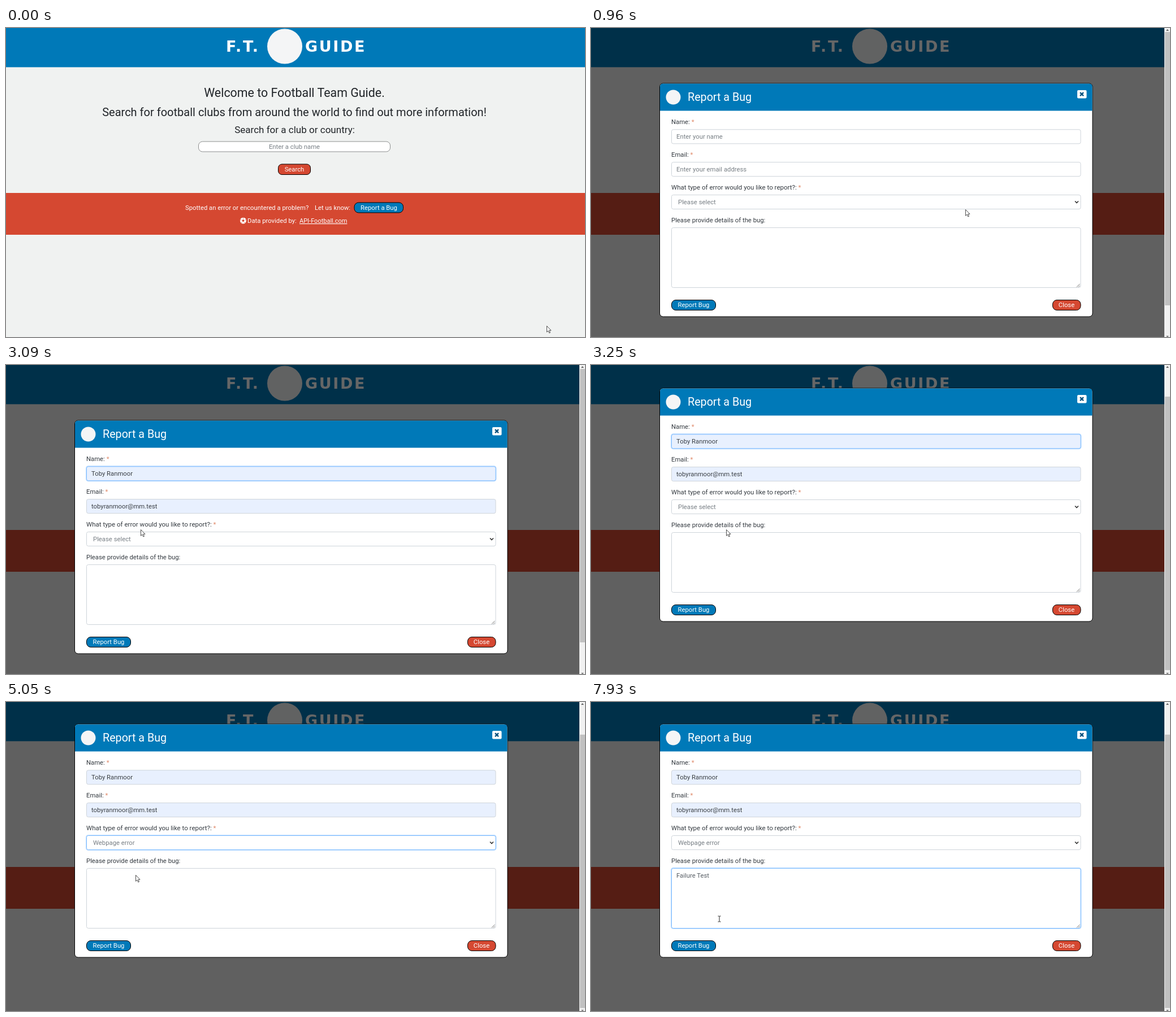
An HTML page for the animation above (8 s loop, 1024 by 547 pixels).

```html
<!DOCTYPE html>
<html lang="en">
<head>
<meta charset="utf-8">
<title>Report a bug</title>
<style>
  html, body { margin: 0; width: 100%; height: 100%; overflow: hidden; background: #f0f2f1; }
  svg { display: block; width: 100vw; height: 100vh; }
  text { font-family: Roboto, "Open Sans", sans-serif; font-size: 11.3px; fill: #343a40; white-space: pre; }
  .heading { fill: #212529; }
  .mid { text-anchor: middle; }
  .light { fill: #fff; }
  .hint { fill: #787f85; }
  .value { fill: #3b4045; }
  .entry { fill: #565d64; }
  .star { fill: #e08a6a; }
  .wordmark { font: bold 27px "DejaVu Sans", sans-serif; letter-spacing: 2.6px; fill: #fff; }
  .box { fill: #fff; stroke: #ced4da; }
  .box.filled { fill: #e8f0fe; }
  .box.focus { stroke: #80bdff; }
  .ring { fill: none; stroke: #bfdeff; stroke-width: 3; }
  .blue { fill: #0079b8; }
  .red { fill: #d54831; }
  .edge { stroke: #000; }
</style>
</head>
<body>
<svg viewBox="0 0 1024 547" preserveAspectRatio="none">
  <defs>
    <filter id="shadow" x="-5%" y="-20%" width="110%" height="150%">
      <feDropShadow dx="0" dy="2" stdDeviation="1.5" flood-opacity=".4"/>
    </filter>
  </defs>

  <rect width="1024" height="547" fill="#f0f2f1"/>
  <rect class="blue" width="1024" height="69.4"/>
  <text class="wordmark" x="389" y="42">F.T.</text>
  <circle cx="493" cy="32.5" r="31" fill="#f4f5f6"/>
  <text class="wordmark" x="529" y="42">GUIDE</text>

  <text class="mid heading" x="510" y="122" style="font-size:21.4px">Welcome to Football Team Guide.</text>
  <text class="mid heading" x="510" y="155.5" style="font-size:20.02px">Search for football clubs from around the world to find out more information!</text>
  <text class="mid heading" x="510.5" y="186" style="font-size:17.05px">Search for a club or country:</text>
  <rect x="340.5" y="201" width="339" height="18" rx="7" fill="#fff" stroke="#8d8f8f"/>
  <text class="mid hint" x="510" y="213.5">Enter a club name</text>
  <rect class="red edge" x="481.5" y="241" width="57" height="18.5" rx="6.5"/>
  <text class="mid light" x="510" y="254">Search</text>

  <rect class="red" y="292" width="1024" height="74"/>
  <text class="light" x="317" y="322">Spotted an error or encountered a problem?</text>
  <text class="light" x="546" y="322">Let us know:</text>
  <rect class="blue edge" x="616" y="309" width="86.5" height="18" rx="7.5"/>
  <text class="mid light" x="659.5" y="322">Report a Bug</text>
  <g transform="translate(419.5 341)">
    <circle r="5.5" fill="#fff"/>
    <path class="red" d="M0-2.2 2.1-.7 1.3 1.8H-1.3L-2.1-.7Z"/>
    <path d="M0-5V-3.5M4.7-1.5 3.4-1.1M2.9 4 2 2.8M-2.9 4-2 2.8M-4.7-1.5-3.4-1.1" stroke="#d54831"/>
  </g>
  <text class="light" x="427" y="345">Data provided by:</text>
  <text class="light" x="519" y="345" text-decoration="underline" style="font-size:11px">API-Football.com</text>

  <g id="dialog">
    <rect width="1024" height="547" opacity=".6"/>
    <g id="panel">
      <rect class="edge" x="121.5" y="98" width="765.5" height="413" rx="6" fill="#fff"/>
      <path class="blue" d="M122 146.600V104Q122 98.500 127.500 98.500H881Q886.500 98.500 886.500 104V146.600Z"/>
      <circle cx="145.500" cy="122.500" r="13" fill="#f4f5f6"/>
      <text class="light" x="171" y="128.500" style="font-size:19.7px">Report a Bug</text>
      <rect x="860" y="110" width="16.500" height="14.500" rx="2" fill="#fff"/>
      <path d="M865 114.200 871 120.200M871 114.200 865 120.200" stroke="#07527f" stroke-width="2.4"/>

      <text x="142" y="170">Name: <tspan class="star">*</tspan></text>
      <text x="142" y="228">Email: <tspan class="star">*</tspan></text>
      <text x="142" y="286" style="font-size:11.5px">What type of error would you like to report?: <tspan class="star">*</tspan></text>
      <text x="142" y="343.500">Please provide details of the bug:</text>
      <g id="fields"></g>
      <text id="name" x="151" y="196"></text>
      <text id="email" x="151" y="254"></text>
      <text id="choice" class="hint" x="154" y="312"></text>
      <path d="M856 306.500 859 309.500 862 306.500" fill="none" stroke="#333" stroke-width="1.6"/>
      <text id="details" class="entry" x="151" y="370"></text>
      <rect id="caret" y="358" width="1" height="15" fill="#222"/>
      <path d="M859 458.500 864.500 453M862 458.500 864.500 456" stroke="#777"/>

      <rect class="blue edge" x="142.500" y="481.500" width="78" height="18" rx="7.500"/>
      <text class="mid light" x="181.500" y="494">Report Bug</text>
      <rect class="red edge" x="816.500" y="481.500" width="49.500" height="18" rx="7.500"/>
      <text class="mid light" x="841" y="494">Close</text>

      <g id="menu">
        <rect x="142.500" y="320.500" width="723" height="45.500" fill="#fff" stroke="#707070" filter="url(#shadow)"/>
        <rect id="mark" x="143" width="722" height="15" fill="#1e90ff"/>
        <g id="options"></g>
      </g>
    </g>
    <rect x="1014" width="10" height="547" fill="#f1f1f1"/>
    <rect id="thumb" x="1015" width="9" height="484" fill="#c1c1c1"/>
    <path d="M1017 5 1019.500 2 1022 5ZM1017 545 1019.500 547 1022 545Z" fill="#606060"/>
  </g>

  <g id="pointer">
    <path id="arrow" d="M.5.500V11.300L3 9 4.800 13 6.500 12.200 4.800 8.300H8Z" fill="#fff" stroke="#222" stroke-width=".8"/>
    <path id="hand" d="M-1 1Q0-.5 1 1V5L6 6.200Q7 6.500 6.800 8L6 13H0L-3.500 8Q-3 6.500-1 8Z" fill="#fff" stroke="#222" stroke-width=".8"/>
    <path id="beam" d="M-2.500-5H-.5L0-4.500.500-5H2.500M0-4.500V4.500M-2.500 5H-.5L0 4.500.500 5H2.500" fill="none" stroke="#222"/>
  </g>
</svg>
<script>
const LOOP = 8000;
const $ = id => document.getElementById(id);
const OPTIONS = ["Please select", "Club data error", "Webpage error"];
const MENU_TOP = 321, ROW = 15;

// Moments of hard change, in ms
const OPEN = 960, FOCUS_NAME = 1840, AUTOFILL = 2070;
const FOCUS_CHOICE = 3800, MENU_OPEN = 3870, CHOOSE = 4810, FOCUS_DETAILS = 5350;
const CARET_BLINK = 530;

const POINTER = [
  [0, 956, 527], [60, 956, 527], [350, 800, 420], [650, 680, 333], [870, 662, 321],
  [1040, 662, 321], [1300, 460, 268], [1600, 255, 208], [1840, 200, 192],
  [1920, 196, 198], [2150, 190, 235], [2300, 192, 238], [2390, 210, 272],
  [2540, 225, 283], [2780, 238, 291], [3090, 238, 291], [3250, 239, 291], [3360, 239, 291],
  [3650, 234, 256], [3870, 231, 250], [3980, 231, 250], [4340, 225, 278],
  [4650, 222, 293], [4810, 222, 294], [5100, 230, 308], [5350, 236, 317],
  [7780, 236, 317], [7840, 235, 340], [7930, 227, 384], [LOOP, 227, 384]
];
const SCROLL = [[3090, 0], [3170, 33], [3250, 57], [3340, 59]];
const TYPED = [
  [5670, "F"], [5830, "Fa"], [6060, "Fai"], [6130, "Fail"], [6280, "Failu"], [6360, "Failur"],
  [6440, "Failure"], [6520, "Failure "], [6900, "Failure T"], [7070, "Failure Tes"], [7150, "Failure Test"]
];

function track(keys, t, column = 1) {
  if (t <= keys[0][0]) return keys[0][column];
  const i = keys.findIndex(key => key[0] > t);
  if (i < 0) return keys.at(-1)[column];
  const a = keys[i - 1], b = keys[i];
  return a[column] + (b[column] - a[column]) * (t - a[0]) / (b[0] - a[0]);
}

function makeField(y, height) {
  const shape = `x="142.5" y="${y}" width="723.5" height="${height}" rx="3"`;
  const group = document.createElementNS("http://www.w3.org/2000/svg", "g");
  group.innerHTML = `<rect class="ring" ${shape}/><rect class="box" ${shape}/>`;
  $("fields").append(group);
  const [ring, box] = group.children;
  return (focus, filled = false) => {
    show(ring, focus);
    box.classList.toggle("focus", focus);
    box.classList.toggle("filled", filled);
  };
}

const show = (node, on) => { node.style.display = on ? "" : "none"; };
const between = (t, from, to) => t >= from && t < to;

function setText(id, text, style) {
  $(id).textContent = text;
  if (style) $(id).setAttribute("class", style);
}

const [nameField, emailField, choiceField, detailsField] =
  [[179.8, 25], [237.6, 25], [295.5, 25], [353.5, 106]].map(size => makeField(...size));

$("options").innerHTML = OPTIONS.map((label, i) =>
  `<text x="154" y="${MENU_TOP + 11 + ROW * i}">${label}</text>`).join("");

function drawForm(t, pointerY, scroll) {
  const filled = t >= AUTOFILL;
  const typing = t >= FOCUS_DETAILS;

  nameField(between(t, FOCUS_NAME, FOCUS_CHOICE), filled);
  emailField(false, filled);
  choiceField(between(t, FOCUS_CHOICE, FOCUS_DETAILS));
  detailsField(typing);

  const style = filled ? "value" : "hint";
  setText("name", filled ? "Toby Ranmoor" : "Enter your name", style);
  setText("email", filled ? "tobyranmoor@mm.test" : "Enter your email address", style);
  setText("choice", OPTIONS[t < CHOOSE ? 0 : 2]);

  const [since, text] = TYPED.findLast(key => key[0] <= t) || [FOCUS_DETAILS, ""];
  setText("details", text);
  const width = text ? $("details").getComputedTextLength() : 0;
  $("caret").setAttribute("x", Math.round(151 + width));
  show($("caret"), typing && (t - since) % (2 * CARET_BLINK) < CARET_BLINK);

  show($("menu"), between(t, MENU_OPEN, CHOOSE));
  const row = Math.max(0, Math.min(2, Math.floor((pointerY + scroll - MENU_TOP) / ROW)));
  $("mark").setAttribute("y", MENU_TOP + ROW * row);
  [...$("options").children].forEach((option, i) =>
    option.setAttribute("class", i === row ? "light" : "hint"));
}

function drawPointer(t, x, y) {
  const beam = between(t, 1740, 1925) || t >= 5180;
  const hand = between(t, 740, OPEN);
  $("pointer").setAttribute("transform", `translate(${x} ${y})`);
  show($("beam"), beam);
  show($("hand"), hand);
  show($("arrow"), !beam && !hand);
}

function draw(t) {
  const x = track(POINTER, t), y = track(POINTER, t, 2);
  const scroll = Math.round(track(SCROLL, t));
  show($("dialog"), t >= OPEN);
  $("panel").setAttribute("transform", `translate(0 ${-scroll})`);
  $("thumb").setAttribute("y", 7 + scroll * .86);
  drawForm(t, y, scroll);
  drawPointer(t, Math.round(x), Math.round(y));
}

function tick() {
  draw(performance.now() % LOOP);
  requestAnimationFrame(tick);
}
tick();
</script>
</body>
</html>
```
